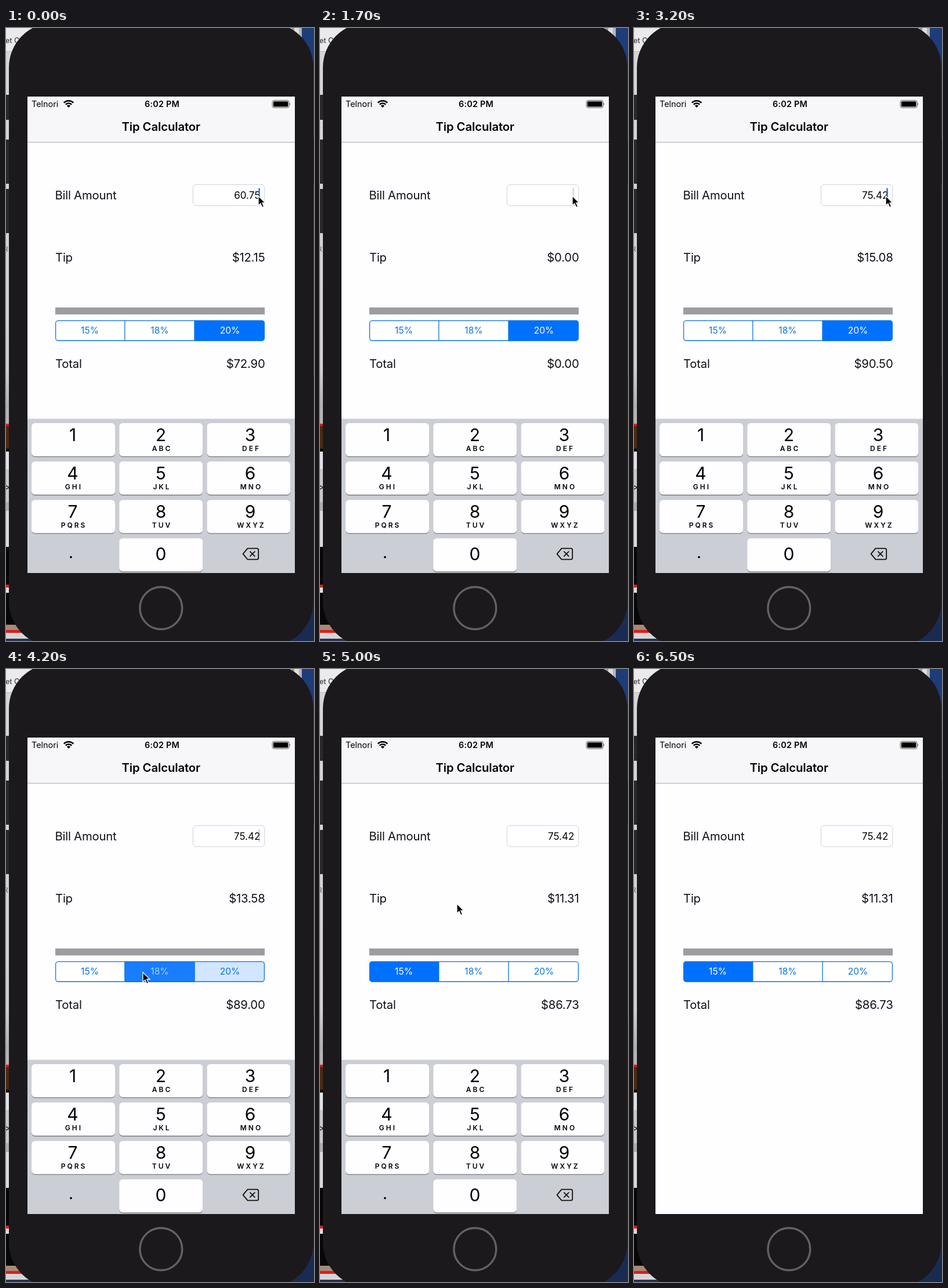
Animation of 531 by 1055 pixels, one loop 6.6 s. Source, as an HTML page:

```html
<!DOCTYPE html>
<html lang="en">
<head>
<meta charset="utf-8">
<title>Tip Calculator</title>
<style>
html, body { margin: 0; width: 100%; height: 100%; overflow: hidden; background: #1b191c; }
svg { display: block; width: 531px; height: 1055px; font-family: Inter, Roboto, sans-serif; }
.anim, .seg rect, .seg text {
  animation-duration: 6.6s;
  animation-iteration-count: infinite;
  animation-timing-function: linear;
}
.body { font-size: 20.3px; letter-spacing: -.2px; fill: #111; }
.title { font-size: 20.3px; font-weight: 600; letter-spacing: -.1px; }
.status { font-size: 14.4px; }
.field { font-size: 17px; }
.mid { text-anchor: middle; }
.end { text-anchor: end; }
.seg { font-size: 15.6px; text-anchor: middle; }
.seg rect { fill: #0070ff; }
.digit { font-size: 30px; text-anchor: middle; }
.abc { font-size: 12px; font-weight: 600; letter-spacing: 3px; text-anchor: middle; }

#pointer { animation-name: pointer; animation-timing-function: ease-in-out; }
#caret { animation-name: caret; }
#menu { animation-name: menu; }
#menu text { animation: menuText 6.6s linear infinite; }
#keypad { animation-name: keypad; animation-timing-function: cubic-bezier(.4, 0, .2, 1); }
.s15 rect { animation-name: on15; }
.s18 rect { animation-name: on18; }
.s20 rect { animation-name: on20; }
.s15 text { animation-name: ink15; }
.s18 text { animation-name: ink18; }
.s20 text { animation-name: ink20; }

@keyframes pointer {
  0%, 47% { transform: translate(435px, 289px); }
  48.3%, 52% { transform: translate(434px, 289px); }
  60.5%, 65% { transform: translate(236px, 522px); }
  69%, 72.5% { transform: translate(150px, 520px); }
  75.5%, 78% { transform: translate(236px, 404px); }
  83%, 87.3% { transform: translate(240px, 528px); }
  92.5%, 100% { transform: translate(262px, 1060px); }
}
@keyframes caret {
  0%, 20.5% { opacity: 1; }
  22%, 25% { opacity: 0; }
  25.8% { opacity: .25; }
  28%, 54.5% { opacity: 1; }
  56.8%, 63% { opacity: 0; }
  63.7% { opacity: .3; }
  65.5%, 71.2% { opacity: 1; }
  73.5%, 100% { opacity: 0; }
}
@keyframes menu {
  0%, .9% { opacity: 0; }
  2.5%, 7% { opacity: 1; }
  9.1% { opacity: .37; }
  10.4%, 100% { opacity: 0; }
}
@keyframes menuText {
  0%, 7% { fill: #fff; }
  9.1%, 100% { fill: #626262; }
}
@keyframes keypad {
  0%, 76.5% { transform: translateY(0); }
  81%, 100% { transform: translateY(266px); }
}
@keyframes on15 { 0%, 70.5% { opacity: 0; } 73%, 100% { opacity: 1; } }
@keyframes on18 {
  0%, 61.4% { opacity: 0; }
  63.6% { opacity: .9; }
  64.4%, 70.5% { opacity: 1; }
  73%, 100% { opacity: 0; }
}
@keyframes on20 {
  0%, 61.4% { opacity: 1; }
  63.6% { opacity: .19; }
  64.4%, 100% { opacity: 0; }
}
@keyframes ink15 { 0%, 70.5% { fill: #0873e6; } 73%, 100% { fill: #fff; } }
@keyframes ink18 {
  0%, 61.4% { fill: #0873e6; }
  63.6% { fill: #9ccaff; }
  64.4%, 70.5% { fill: #fff; }
  73%, 100% { fill: #0873e6; }
}
@keyframes ink20 { 0%, 61.4% { fill: #fff; } 63.6%, 100% { fill: #0873e6; } }
</style>
</head>
<body>
<svg viewBox="0 0 531 1055">
  <defs>
    <linearGradient id="page" x1="0" y1="0" x2="0" y2="1">
      <stop offset="0" stop-color="#d6d6d8"/>
      <stop offset=".85" stop-color="#d0d0d2"/>
      <stop offset="1" stop-color="#a4a4a7"/>
    </linearGradient>
    <clipPath id="screen"><rect x="37" y="118" width="461" height="820"/></clipPath>
    <clipPath id="segments"><rect x="85" y="503" width="361" height="35.5" rx="5"/></clipPath>
  </defs>

  <!-- desktop behind the phone -->
  <rect width="531" height="1055" fill="#d2d2d4"/>
  <rect width="100" height="41" fill="#eaeaec"/>
  <rect y="40" width="40" height="1" fill="#b9b9bb"/>
  <text x="-1" y="26" font-size="12.5" font-weight="500" fill="#444">et C</text>
  <rect y="41" width="20" height="640" fill="url(#page)"/>
  <text x="-4" y="385" font-size="12" fill="#666">R</text>
  <g id="strip"></g>
  <text x="-4" y="796" font-size="18" fill="#222">&gt;</text>
  <rect x="440" width="70" height="60" fill="#dededf"/>
  <rect x="492" width="5" height="8" fill="#9a9a9c"/>
  <rect x="505" width="5" height="60" fill="#b4b4b8"/>
  <rect x="510" width="21" height="600" fill="#1d3c78"/>
  <rect x="440" y="600" width="91" height="455" fill="#1a2b52"/>
  <rect x="529" y="192" width="2" height="76" fill="#222124"/>
  <g fill="#29282a">
    <rect x="-5" y="115" width="14" height="43" rx="3"/>
    <rect x="-5" y="192" width="14" height="76" rx="3"/>
    <rect x="-5" y="277" width="14" height="76" rx="3"/>
  </g>

  <!-- phone -->
  <rect x="5" y="-9" width="525" height="1073" rx="77" fill="#1b191c"/>
  <circle cx="267.3" cy="998.4" r="36.4" fill="none" stroke="#636165" stroke-width="3.4"/>
  <rect x="37" y="118" width="461" height="820" fill="#fefdff"/>
  <rect x="37" y="118" width="461" height="79" fill="#f7f6f9"/>
  <rect x="37" y="196" width="461" height="1.2" fill="#b6b5b9"/>

  <!-- status bar -->
  <text class="status" x="44" y="136">Telnori</text>
  <g fill="none" stroke="#000" stroke-width="2.6">
    <path d="M99.7 128.7A11.7 11.7 0 0 1 116.3 128.7M102.7 131.7A7.5 7.5 0 0 1 113.3 131.7"/>
    <path d="M108 137L104.8 133.8A4.6 4.6 0 0 1 111.2 133.8Z" fill="#000" stroke="none"/>
  </g>
  <text class="status mid" x="269" y="136" font-weight="600" letter-spacing=".2">6:02 PM</text>
  <rect x="459.1" y="124.6" width="29" height="12.6" rx="3" fill="none" stroke="#555" stroke-width="1"/>
  <rect x="460.8" y="126.2" width="25.6" height="9.4" rx="1.6"/>
  <path d="M489.3 128.8Q491.2 130.9 489.3 133Z" fill="#444"/>
  <text class="title mid" x="267.3" y="177.3">Tip Calculator</text>

  <!-- form -->
  <g class="body">
    <text x="84.4" y="294.6">Bill Amount</text>
    <text x="85" y="401.8">Tip</text>
    <text x="85" y="585">Total</text>
    <text id="tip" class="end" x="446.5" y="401.8">$12.15</text>
    <text id="total" class="end" x="446.5" y="585">$72.90</text>
  </g>
  <rect x="322.4" y="269.4" width="123.4" height="36.4" rx="6" fill="#fff" stroke="#d0cfd4"/>
  <text id="bill" class="field end" x="438.3" y="293.6">60.75</text>
  <rect id="caret" class="anim" x="435.4" y="275.6" width="2.3" height="22.6" fill="#2f62e6"/>
  <rect x="85" y="481" width="361" height="12" fill="#9d9c9f"/>
  <g clip-path="url(#segments)">
    <rect x="85" y="503" width="361" height="36" fill="#fff"/>
    <g class="seg s15"><rect x="85" y="503" width="120" height="36"/><text x="144.5" y="526.4">15%</text></g>
    <g class="seg s18"><rect x="205" y="503" width="120" height="36"/><text x="265" y="526.4">18%</text></g>
    <g class="seg s20"><rect x="325" y="503" width="121" height="36"/><text x="386" y="526.4">20%</text></g>
  </g>
  <g fill="none" stroke="#0873e6" stroke-width="1.3">
    <rect x="85.6" y="503.6" width="359.8" height="34.4" rx="4.5"/>
    <path d="M204.8 503V538M325 503V538"/>
  </g>

  <!-- edit menu -->
  <g id="menu" class="anim">
    <path fill="#1c1c1c" d="M286 209H476a9 9 0 0 1 9 9V244a9 9 0 0 1 -9 9H448L437 264L426 253H286a9 9 0 0 1 -9 -9V218a9 9 0 0 1 9 -9Z"/>
    <rect x="368" y="209" width="1.2" height="44" fill="#fff"/>
    <text class="field mid" x="323" y="237.4">Select</text>
    <text class="field mid" x="427" y="237.4">Select All</text>
  </g>

  <g clip-path="url(#screen)">
    <g id="keypad" class="anim">
      <rect x="37" y="672.5" width="461" height="268" fill="#cbced5"/>
      <g id="keys"></g>
      <circle cx="112" cy="910.6" r="1.9"/>
      <g fill="none" stroke="#111" stroke-width="1.8" stroke-linejoin="round" stroke-linecap="round">
        <path d="M416.5 895.7H432.5Q435.2 895.7 435.2 898.4V912Q435.2 914.7 432.5 914.7H416.5L408.6 905.2Z"/>
        <path d="M420.8 901.2L428.8 909.2M428.8 901.2L420.8 909.2"/>
      </g>
    </g>
  </g>

  <g id="pointer" class="anim">
    <path d="M0 0V16.6L3.9 13.1L6.6 19.6L9.6 18.4L6.9 12H12Z" fill="#000" stroke="#fff" stroke-width="1.3"/>
  </g>
</svg>
<script>
const LOOP = 6600;
const $ = id => document.getElementById(id);

// Window edges showing at the left of the phone: top, colour
const bands = [
  [655, "#b5b5b8"], [681, "#e01818"], [685, "#4b2a12"], [724, "#080808"], [729, "#e2e2e4"],
  [759, "#c9c9cc"], [816, "#aeaeb1"], [831, "#dadadc"], [893, "#060606"], [958, "#d9201c"],
  [963, "#dedee0"], [972, "#070707"], [1027, "#a58a78"], [1036, "#d9201c"], [1041, "#d6d6d9"],
  [1051, "#29334d"]
];
$("strip").innerHTML = bands.map(([y, color], i) => {
  const end = i + 1 < bands.length ? bands[i + 1][0] : 1055;
  return `<rect y="${y}" width="60" height="${end - y}" fill="${color}"/>`;
}).join("");

function key(digit, letters, col, row) {
  const x = 44 + col * 151.2, y = 680 + row * 66.1;
  const mid = [115, 267, 421][col];
  const base = y + (digit === "0" ? 37.6 : 30.6);
  return `<rect x="${x}" y="${y + 1.4}" width="144" height="57.2" rx="6" fill="#898b90"/>
    <rect x="${x}" y="${y}" width="144" height="57" rx="6" fill="#fefdff"/>
    <text class="digit" x="${mid}" y="${base}">${digit}</text>
    <text class="abc" x="${mid + 2}" y="${y + 48}">${letters}</text>`;
}
const letters = ["", "ABC", "DEF", "GHI", "JKL", "MNO", "PQRS", "TUV", "WXYZ"];
$("keys").innerHTML = letters.map((s, i) =>
  key(String(i + 1), s, i % 3, Math.floor(i / 3))).join("") + key("0", "", 1, 3);

// Time in ms, value from then on
const bills = [
  [0, "60.75"], [460, "60.7"], [760, "60."], [860, "60"], [960, "6"], [1060, ""],
  [2260, "7"], [2460, "75"], [2760, "75."], [2910, "75.4"], [3060, "75.42"]
];
const rates = [[0, 20], [4060, 18], [4660, 15]];
const at = (steps, t) => steps.filter(s => s[0] <= t).pop()[1];
const money = cents => "$" + (cents / 100).toFixed(2);

function put(id, text) {
  if ($(id).textContent !== text) $(id).textContent = text;
}

const start = performance.now();
function draw() {
  const t = (performance.now() - start) % LOOP;
  const bill = at(bills, t);
  const cents = Math.round(Number(bill) * 100);
  const tip = cents * at(rates, t) / 100;
  put("bill", bill);
  put("tip", money(Math.round(tip)));
  put("total", money(Math.round(cents + tip)));
  requestAnimationFrame(draw);
}
draw();
</script>
</body>
</html>
```
